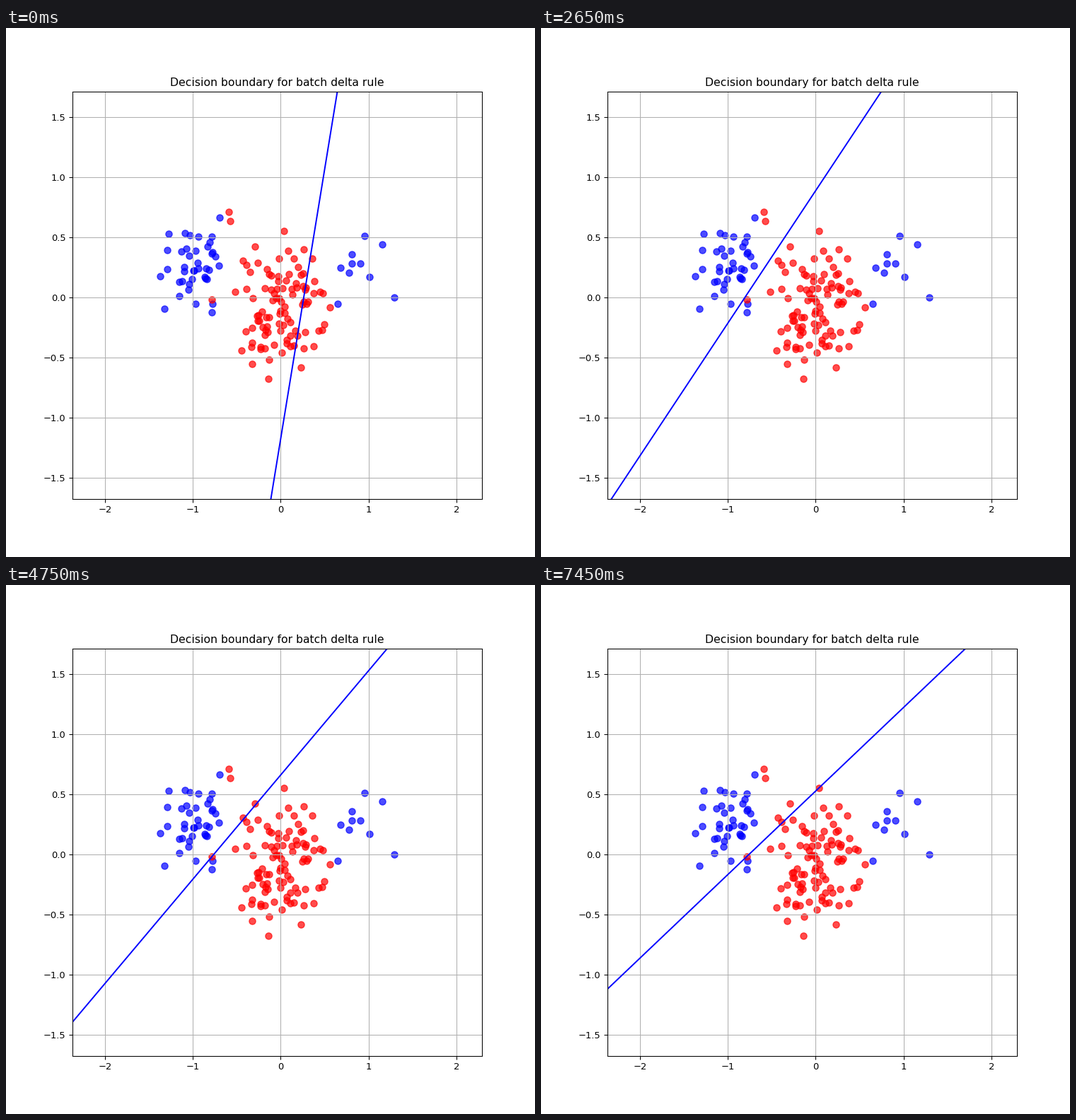
Recreate the animation shown at these times as a matplotlib script. Size 748 px wide and 748 px high, loop 7500 ms.

```python
import numpy as np
import matplotlib.pyplot as plt
from matplotlib.animation import FuncAnimation

FRAMES, INTERVAL = 150, 50
X_LIM, Y_LIM = (-2.372, 2.292), (-1.674, 1.716)

# Weights (x, y, bias) relax towards the least-squares solution
# along the three eigenvectors of the input correlation matrix.
W_END = np.array([-.575, 1.391, -.481])
MODES = np.array([[.1815, 1, .024], [1, -.189, .329], [-.323, .0345, 1]])
AMPS = np.array([-1.2225, .6645, .3567])
RATES = np.array([.0064, .0224, .077])

rng = np.random.default_rng(7)


def cluster(n, center, sigma):
    """Gaussian cloud with its far tail cut off."""
    r = sigma * np.sqrt(-2 * np.log(1 - .92 * rng.random(n)))
    angle = rng.uniform(0, 2 * np.pi, n)
    return np.column_stack([r * np.cos(angle), r * np.sin(angle)]) + center


def weights(epoch):
    return W_END + (AMPS * np.exp(-RATES * epoch)) @ MODES


# Outermost points fix the extent of each class.
edge_a = [(-1.368, .178), (-1.322, -.094), (-.692, .667),
          (1.156, .444), (1.296, .003), (.650, -.054)]
edge_b = [(-.592, .714), (-.572, .637), (.036, .555),
          (-.781, -.018), (.560, -.080), (-.136, -.677)]
class_a = np.vstack([edge_a, cluster(37, (-.95, .26), .19),
                     cluster(7, (.86, .31), .11)])
class_b = np.vstack([edge_b, cluster(94, (-.02, -.09), .27)])

fig, ax = plt.subplots(figsize=(8, 8), dpi=93.5)
for pts, color in (class_a, "blue"), (class_b, "red"):
    ax.scatter(*pts.T, s=50, color=color, alpha=.7)
ax.set(xlim=X_LIM, ylim=Y_LIM, title="Decision boundary for batch delta rule")
ax.grid(True)
line, = ax.plot([], [], color="blue")


def update(epoch):
    wx, wy, bias = weights(epoch)
    x = np.array(X_LIM)
    line.set_data(x, -(wx * x + bias) / wy)
    return line,


anim = FuncAnimation(fig, update, frames=FRAMES, interval=INTERVAL,
                     repeat=True, repeat_delay=0)
plt.show()
```
